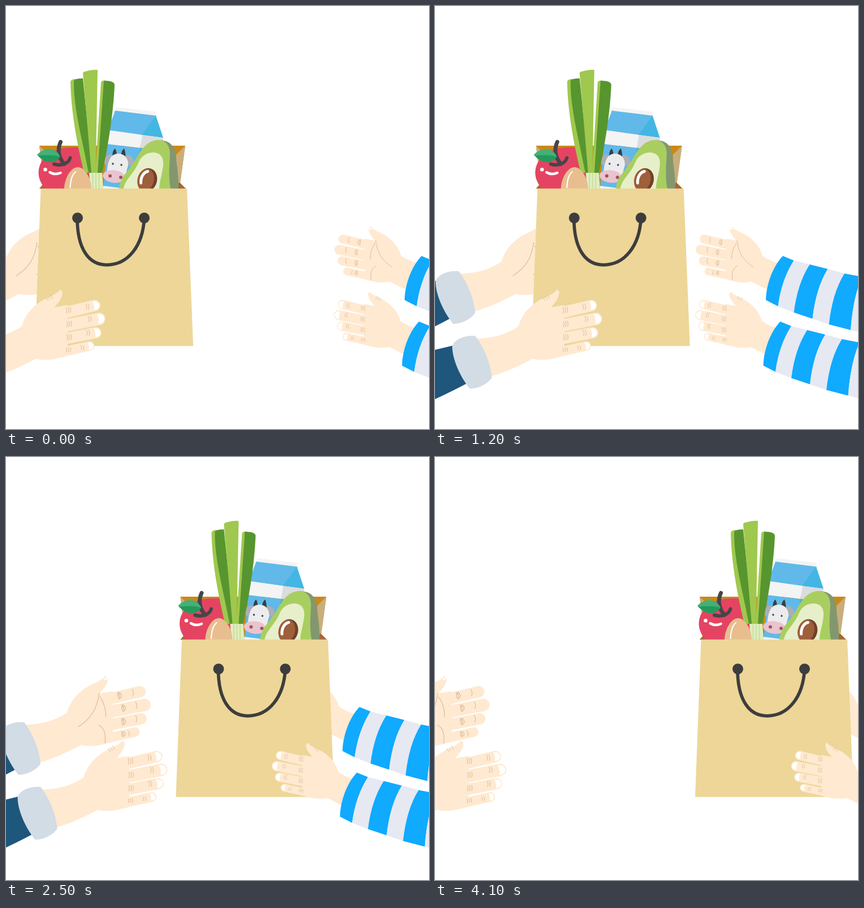
Animation, 748 px wide and 748 px high, one loop 4.2 s. Source, as an HTML page with a canvas:

```html
<!DOCTYPE html>
<html>
<head>
<meta charset="utf-8">
<style>
html, body { margin: 0; width: 100%; height: 100%; overflow: hidden; background: #fff; }
canvas { display: block; }
</style>
</head>
<body>
<canvas id="stage" width="748" height="748"></canvas>
<script>
const ctx = document.getElementById('stage').getContext('2d');
const STEP_MS = 100, STEPS = 42, SPEED = 9.976, TURN = 18;
const SKIN = '#ffe9d0', CREASE = '#dabb9a', DARK = '#3d3d3d';
const LEAF = '#9fc84e', DEEP = '#57952f';

function fill(color, d) {
  ctx.fillStyle = color;
  ctx.fill(new Path2D(d));
}
function line(color, width, d) {
  ctx.strokeStyle = color;
  ctx.lineWidth = width;
  ctx.lineCap = 'round';
  ctx.stroke(new Path2D(d));
}
function oval(color, x, y, rx, ry = rx, angle = 0) {
  ctx.fillStyle = color;
  ctx.beginPath();
  ctx.ellipse(x, y, rx, ry, angle, 0, 7);
  ctx.fill();
}
function at(x, y, draw, sx = 1, sy = sx) {
  ctx.save();
  ctx.translate(x, y);
  ctx.scale(sx, sy);
  draw();
  ctx.restore();
}

// Base y, tip x, tip y, thickness
const FINGERS = [
  [427, 237, 415, 20],
  [450, 245, 438.5, 22],
  [473, 239, 463, 20],
  [495.5, 228, 486.5, 17]
];

function palmCreases() {
  line(CREASE, 1.2, 'M164.5 418C161 445 151 462 128 477M166 424Q177 440 176.500 459M164 474Q178 481 175 506');
  [[200, 422, 224, 417], [207, 444, 230, 439], [207, 468, 230, 463], [207, 490, 217, 489]].forEach(([x, y, ax, ay], i) => {
    const h = i < 3 ? 6 : 4.5;
    line(CREASE, 1.1, `M${x - 3} ${y - h}q7 ${h} 2 ${2 * h}M${x + 1} ${y - h}q-7 ${h} 0 ${2 * h}M${x + 1} ${y - h}q6 ${h} 1 ${2 * h - 1}M${ax - 1} ${ay - h}q4 ${h} 1 ${2 * h}`);
  });
  line('#fff', 3, 'M174.500 393Q178 393 179 389');
}

function knuckles() {
  const pairs = [[224, 417], [228, 438.5], [225, 463], [215, 489.5]];
  [[191, 423], [192, 447.5], [192, 471], [191, 493]].forEach(([x, y], i) => {
    const h = i < 3 ? 5 : 3.5;
    for (const dx of [-3.5, 0, 3.5])
      line(CREASE, 1, `M${x + dx - .5} ${y - h - dx * .1}q2 ${h} 0 ${2 * h}`);
    const [px, py] = pairs[i];
    for (const dx of [-2, 2])
      line(CREASE, 1, `M${px + dx - 1} ${py - h}q4 ${h} 1 ${2 * h}`);
  });
  line(CREASE, 1, 'M151 401l4 5M155 399l4 5M159 396l4 6');
}

function nails() {
  for (const [, x, y, w] of FINGERS) {
    const r = w / 2 - 2.3;
    ctx.save();
    ctx.translate(x + .5, y);
    ctx.rotate(-.17);
    fill('#fff', `M-3 ${-r}H0A${r} ${r} 0 0 1 0 ${r}H-3Q0 0 -3 ${-r}Z`);
    ctx.restore();
  }
}

function hand(palmUp) {
  fill(SKIN, 'M30 474C60 472 82 469 108 452C115 426 135 410 152 402C165 396 171 393 175 388C178 386 181 390 180 394C179 403 172 411 166 418L189 414V504L166 509.5C152 512 140 511 133 509C105 524 80 535 50 543Z');
  for (const [base, x, y, w] of FINGERS)
    line(SKIN, w, `M182 ${base + 1}L${x} ${y}`);
  if (palmUp) palmCreases();
  else { knuckles(); nails(); }
}

function leftArm(palmUp) {
  hand(palmUp);
  fill('#1f567c', 'M0 483.500L-9 486L-120 513V617.500L-50 585.500Q-10 567 18 552Z');
  fill('#d2dce5', 'M-9 487C-5 474 15 467 32 469C47 488 60 520 61 543C52 555 36 562 22 562C5 541 -9 510 -9 487Z');
}

// Stripe edges: top x, top y, bottom x, bottom y
const STRIPES = [
  [655, 442, 625, 520], [674.5, 450, 646.5, 531], [702.5, 457, 674.5, 542], [734.5, 465, 707.5, 553],
  [764, 473, 736.5, 563], [795.5, 479, 775, 573], [824.5, 484, 804.5, 580], [856, 489, 840, 587]
];

function stripedSleeve() {
  const bend = (tx, bx) => bx + .22 * (tx - bx);
  for (let i = 0; i < STRIPES.length - 1; i++) {
    const [ax, ay, bx, by] = STRIPES[i], [cx, cy, dx, dy] = STRIPES[i + 1];
    const start = i ? `Q${bend(ax, bx)} ${ay + 34} ${bx} ${by}` : `C638 460 626 490 ${bx} ${by}`;
    fill(i % 2 ? '#e6e9f2' : '#10aaff',
      `M${ax} ${ay}${start}L${dx} ${dy}Q${bend(cx, dx)} ${cy + 34} ${cx} ${cy}Z`);
  }
}

function rightArm(palmUp) {
  at(palmUp ? 705 : 704, palmUp ? 81.6 : 197.1, () => hand(palmUp), -.797, .797);
  at(palmUp ? 0 : -4.5, palmUp ? 0 : 116, stripedSleeve);
}

function milk() {
  fill('#f4f4f4', 'M196 179L265 187L267 195L191 186Z');
  fill('#60b9e9', 'M193 185L266 194L241 228L180 220Z');
  fill('#43b6e3', 'M265 194L278 233L240 228Z');
  fill('#f4f4f4', 'M182 219.500L241 228L237 251L178 244Z');
  fill('#dadcde', 'M241 228L278 233L275 256L237 251Z');
  fill('#60b9e9', 'M179 244L237 251L228 323H172Z');
  fill('#43b6e3', 'M237 251L275 256L268 323H228Z');
  fill('#f4f4f4', 'M172 318L212 323H172Z');
  oval('#adadb6', 181, 272, 7, 10, .5);
  oval('#adadb6', 218, 273, 7, 10, -.5);
  fill(DARK, 'M188 268Q188 255 193 252Q196 258 196 266ZM203 266Q204 255 209 252Q212 260 211 268Z');
  fill('#ececee', 'M178 297C180 275 184 261 199 261C212 262 217 272 216 282Q213 290 212 302Z');
  oval('#e9c4ce', 191, 301.5, 20, 11, .12);
  oval('#a25361', 184, 300.5, 3);
  oval('#a25361', 203, 303, 3);
  oval(DARK, 189, 279, 1.7);
  oval(DARK, 204, 281, 1.7);
}

function apple() {
  fill('#e44462', 'M70 323C57 310 54 292 62 277C70 262 88 250 115 250C134 249 145 254 150 262V323Z');
  line('#474549', 7, 'M96.500 240.500C91 252 92 268 103 279');
  line('#474549', 6, 'M85 279.500C97 283 110 280 113.500 268.500');
  fill('#42b079', 'M55 263C67 250 88 248 96 267Z');
  fill('#239a5b', 'M55 263C68 279 86 281 96 266.500C82 262 68 265 55 263Z');
  oval('#fff', 69.5, 289.3, 3.3);
  line('#fff', 4.5, 'M77.500 294Q86 299.500 96.500 295');
}

function leek() {
  fill(LEAF, 'M114 134Q115 129 124 129L150 295H138C127 250 115 190 114 134Z');
  fill(DEEP, 'M120 133Q121 128 136 128L153 295H146C136 240 119 180 120 133Z');
  fill(LEAF, 'M168 135Q169 131 177 132L165 295H158Z');
  fill(DEEP, 'M173 132Q191 132 192 139C190 190 180 250 170 295H162Z');
  fill(LEAF, 'M136 119Q136 116 143 115Q155 112 162 113L158.500 295H151Z');
  fill('#e0edc0', 'M147 295H170L172 323H149Z');
  line('#c8de98', 1.8, 'M153.500 296V323M159 296V323M164.500 296V323');
}

function egg() {
  fill('#e8be8f', 'M103 323C103 306 114 285 127 285C140 285 151 306 151 323Z');
  line('#fff', 2.2, 'M113.500 321C114 308 117 298 123 293');
}

function avocado() {
  fill('#83976f', 'M265 238C287 235 298 246 300 262C302 285 306 300 305 323H283Z');
  fill('#a9ce60', 'M200 323C202 300 220 290 234 263C246 243 258 237 270 237C284 238 290 248 290 262C289 285 287 300 291 323Z');
  fill('#e7efca', 'M208 323C211 305 226 298 235 275C242 262 252 259 261 259C275 260 279 270 278 281C276 300 271 310 271 323Z');
  ctx.save();
  ctx.beginPath();
  ctx.rect(225, 280, 50, 43);
  ctx.clip();
  oval('#733f28', 250, 307.5, 17, 21, .25);
  oval('#9e5f3b', 247, 307.5, 14.5, 20, .25);
  line('#fff', 5, 'M238.500 313C238 303 243 294 250.500 292.500');
  ctx.restore();
}

function bag() {
  fill('#c98a17', 'M59 247H317L308 313L318 323H59L67 313Z');
  fill('#c9ae7c', 'M59 247L74 262V313H67ZM317 247L301 263V312H308Z');
  fill('#a4673a', 'M68 313L59 323H78ZM307 312L318 323H300Z');
  milk();
  apple();
  leek();
  egg();
  avocado();
  fill('#edd698', 'M61.500 322.800H320L331 601.300H51Z');
  oval(DARK, 126.5, 374.7, 9.5);
  oval(DARK, 244.5, 374.7, 9.5);
  line(DARK, 5.7, 'M126 375C126 429 146 457.800 178 457.800C216 457.800 242 424 244.500 375');
}

function draw(step) {
  const reach = SPEED * (TURN - Math.abs(step - TURN));
  const leftX = reach - SPEED * 11, rightX = SPEED * 8 - reach;
  ctx.fillStyle = '#fff';
  ctx.fillRect(0, 0, 748, 748);
  at(leftX, 0, () => leftArm(true));
  at(rightX, 0, () => rightArm(true));
  at(step * SPEED, 0, bag);
  at(leftX + 29.5, 114.7, () => leftArm(false));
  at(rightX, 0, () => rightArm(false));
}

const start = performance.now();
function frame() {
  draw(Math.floor((performance.now() - start) / STEP_MS) % STEPS);
  requestAnimationFrame(frame);
}
frame();
</script>
</body>
</html>
```
